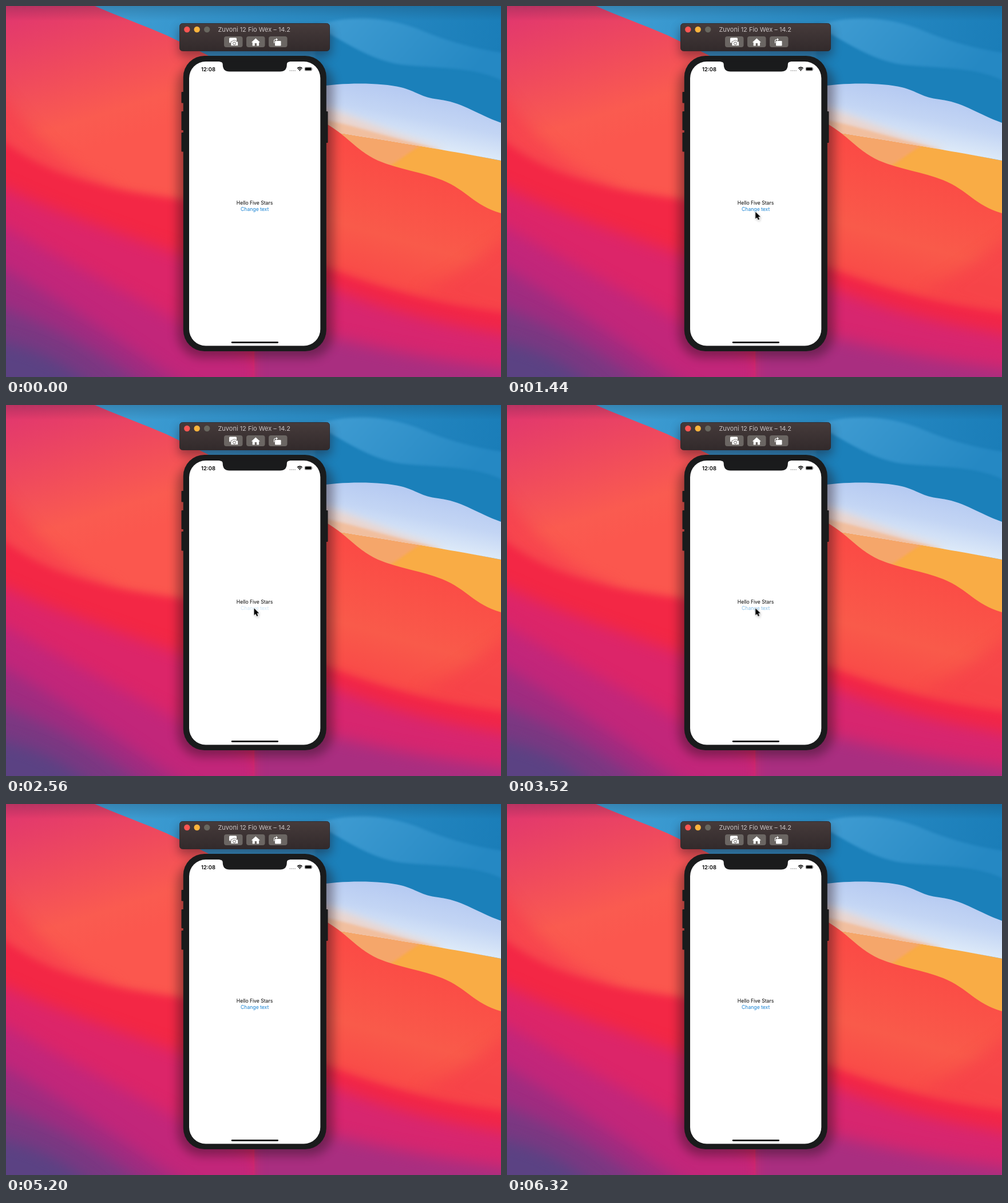
Recreate the animation shown at these times as an HTML page. Size 865 by 648 pixels, loop 6.4 s.

```html
<!DOCTYPE html>
<html lang="en">
<head>
<meta charset="utf-8">
<title>Simulator</title>
<style>
  html, body { margin: 0; width: 100%; height: 100%; overflow: hidden; background: #1b80bb; }
  svg { display: block; width: 865px; height: 648px; }
  text { font-family: Inter, sans-serif; }
  .soft { filter: blur(13px); }
  .mid { filter: blur(7px); }
  .fine { filter: blur(2px); }
  .shadow { filter: blur(9px); }
  #link { animation: press 6400ms linear infinite; }
  #cursor { animation: move 6400ms linear infinite; }

  @keyframes press {
    0%, 37.4% { opacity: 1; }
    37.5%, 41.25% { opacity: .2; }
    46.25%, 49.9% { opacity: 1; }
    50%, 53.125% { opacity: .2; }
    58.125%, 100% { opacity: 1; }
  }
  @keyframes move {
    0%, 8.75% { transform: translate(434px, 670px); animation-timing-function: ease-out; }
    22.5% { transform: translate(433.6px, 359px); }
    35%, 41.25% { transform: translate(433px, 354.5px); }
    50%, 57.5% { transform: translate(433.6px, 354.5px); animation-timing-function: ease-in; }
    66.25% { transform: translate(433px, 398px); animation-timing-function: ease-in; }
    76.25%, 100% { transform: translate(433px, 670px); }
  }
</style>
</head>
<body>
<svg viewBox="0 0 865 648">
  <defs>
    <linearGradient id="sky" x1="0" y1="0" x2="1" y2=".15">
      <stop offset="0" stop-color="#4aa6da"/>
      <stop offset=".55" stop-color="#2d8fc8"/>
      <stop offset="1" stop-color="#1a7db8"/>
    </linearGradient>
    <linearGradient id="lobe" x1="0" y1="0" x2="1" y2=".3">
      <stop offset="0" stop-color="#419dd3"/>
      <stop offset="1" stop-color="#2588c3"/>
    </linearGradient>
    <linearGradient id="mist" gradientUnits="userSpaceOnUse" x1="700" y1="150" x2="680" y2="250">
      <stop offset="0" stop-color="#b7cbf2"/>
      <stop offset=".4" stop-color="#c3d5f4"/>
      <stop offset="1" stop-color="#e6f1fa"/>
    </linearGradient>
    <linearGradient id="warm" gradientUnits="userSpaceOnUse" x1="70" y1="0" x2="150" y2="250">
      <stop offset="0" stop-color="#e2386d"/>
      <stop offset=".45" stop-color="#f04b5c"/>
      <stop offset=".8" stop-color="#fa5b50"/>
      <stop offset="1" stop-color="#fb574e"/>
    </linearGradient>
    <linearGradient id="coral" gradientUnits="userSpaceOnUse" x1="720" y1="270" x2="660" y2="480">
      <stop offset="0" stop-color="#fb4a45"/>
      <stop offset=".65" stop-color="#f95a4a"/>
      <stop offset="1" stop-color="#f94b48"/>
    </linearGradient>
    <linearGradient id="bar" x1="0" y1="0" x2="0" y2="1">
      <stop offset="0" stop-color="#463b3b"/>
      <stop offset="1" stop-color="#322a2b"/>
    </linearGradient>
    <linearGradient id="dim" x1="0" y1="0" x2="0" y2="1">
      <stop offset="0" stop-color="#123" stop-opacity=".2"/>
      <stop offset="1" stop-color="#123" stop-opacity="0"/>
    </linearGradient>
    <clipPath id="left"><path d="M0 0H155C210 24 265 42 305 63C350 84 400 110 434 130V648H0Z"/></clipPath>
    <clipPath id="right"><path d="M434 110C500 160 535 187 562 207C600 230 612 252 650 270C688 286 727 290 762 304C806 322 817 348 865 362V648H434Z"/></clipPath>
    <clipPath id="pale"><path id="paleEdge" d="M540 142C590 133 655 134 690 142C717 149 727 160 755 163C800 169 820 188 865 204V270C770 252 700 240 540 215Z"/></clipPath>
  </defs>

  <!-- sky -->
  <rect width="865" height="648" fill="url(#sky)"/>
  <path class="fine" d="M540 30C590 60 640 98 700 103C760 107 820 106 870 130V215H540Z" fill="#1b80ba"/>
  <path class="fine" d="M540 35C600 15 660 18 720 40C770 62 820 75 870 82V132C820 106 760 109 700 103C640 98 590 60 540 35Z" fill="url(#lobe)"/>

  <!-- mist and sunlight -->
  <path d="M540 195C620 218 735 245 865 270V370H540Z" fill="#f9ac45"/>
  <path class="fine" d="M540 190C620 212 690 236 727 243C708 252 690 268 670 280L540 260Z" fill="#f5a66a"/>
  <use href="#paleEdge" fill="url(#mist)"/>
  <g clip-path="url(#pale)">
    <path class="mid" d="M540 175C600 185 650 218 770 250L540 240Z" fill="#ead4cd"/>
    <path class="fine" d="M540 195C610 208 680 234 760 250L540 240Z" fill="#f1bf9f"/>
  </g>

  <!-- left waves -->
  <g clip-path="url(#left)">
    <rect width="440" height="648" fill="url(#warm)"/>
    <path class="soft" d="M-60 90C30 190 60 270 200 320L-60 400Z" fill="#f63d4d" opacity=".7"/>
    <path class="mid" d="M-40 205C60 300 160 325 440 352V690H-60Z" fill="#f32745"/>
    <path class="soft" d="M-40 300C60 350 160 385 440 480V690H-60Z" fill="#dc2569"/>
    <path class="soft" d="M-40 365C60 420 200 500 440 620V690H-60Z" fill="#c2267a"/>
    <path class="soft" d="M-40 440C60 490 180 570 350 690H-60Z" fill="#9f2c80"/>
    <path class="soft" d="M-40 515C50 545 170 600 275 690H-60Z" fill="#7a3882"/>
    <path class="soft" d="M-40 580C30 590 110 615 175 690H-60Z" fill="#5b4283"/>
  </g>

  <!-- right waves -->
  <g clip-path="url(#right)">
    <rect x="434" width="431" height="648" fill="url(#coral)"/>
    <path class="soft" d="M900 390C840 420 800 470 720 500L900 560Z" fill="#f63f49" opacity=".7"/>
    <path class="mid" d="M430 400C600 482 740 520 910 540V690H430Z" fill="#f22647"/>
    <path class="soft" d="M430 420C580 518 740 552 910 580V690H430Z" fill="#d7266f"/>
    <path class="soft" d="M430 540C580 586 720 615 910 640V690H430Z" fill="#a92e80"/>
  </g>
  <rect width="865" height="26" fill="url(#dim)"/>

  <!-- shadows -->
  <rect class="shadow" x="300" y="98" width="272" height="516" rx="42" fill="#201018" opacity=".42"/>
  <rect class="shadow" x="302" y="38" width="266" height="50" rx="6" fill="#201018" opacity=".42"/>

  <!-- title bar -->
  <rect x="303.5" y="30.5" width="262" height="48" rx="5" fill="url(#bar)" stroke="#2c2425" stroke-width=".8"/>
  <circle cx="316.3" cy="41" r="5.2" fill="#fc5552"/>
  <circle cx="333.7" cy="41" r="5.2" fill="#fcb33d"/>
  <circle cx="351.2" cy="41" r="5.2" fill="#68675f"/>
  <text x="433.7" y="45" font-size="11" text-anchor="middle" fill="#c9c3c3">Zuvoni 12 Fio Wex – 14.2</text>
  <g fill="#6b6663">
    <rect x="381" y="53" width="32.500" height="19" rx="4"/>
    <rect x="420" y="53" width="32.500" height="19" rx="4"/>
    <rect x="459" y="53" width="32.500" height="19" rx="4"/>
  </g>
  <g fill="#fff">
    <rect x="390" y="55.500" width="13" height="9" rx="1.500"/>
    <path d="M393 62H395.500L397 60H401L402.500 62H405.500V69.500H393Z" stroke="#6b6663" stroke-width=".8"/>
    <circle cx="399" cy="65.500" r="2.500" stroke="#6b6663" fill="#fff"/>
    <path d="M436.300 56.500L444 63.500H442V69.500H438V65H434.700V69.500H430.700V63.500H428.700Z"/>
    <rect x="470" y="61" width="10.500" height="8.500" rx="1.200"/>
    <path d="M468.500 65V60.500Q468.500 58.500 471 58.500H472.500" fill="none" stroke="#fff" stroke-width="1.100"/>
    <path d="M472 56L475 58.500L472 61Z"/>
  </g>

  <!-- phone -->
  <g fill="#1a1b1c">
    <rect x="306.500" y="150" width="6" height="19.500" rx="1"/>
    <rect x="306.500" y="184" width="6" height="33" rx="1"/>
    <rect x="306.500" y="221" width="6" height="33.500" rx="1"/>
    <rect x="557" y="184" width="5.500" height="55" rx="1"/>
    <rect x="309.800" y="87" width="250" height="516" rx="37"/>
  </g>
  <rect x="320" y="97" width="229.300" height="496.500" rx="29" fill="#fff"/>
  <path d="M373 96.500H496V97.200Q490.800 97.500 490.800 102Q490.800 114.500 479 114.500H390.500Q378.700 114.500 378.700 102Q378.700 97.500 373 97.200Z" fill="#1a1b1c"/>
  <rect x="393.700" y="586.200" width="82.300" height="2.800" rx="1.400" fill="#000"/>

  <!-- status bar -->
  <text x="353.500" y="113.500" font-size="9.300" font-weight="600" text-anchor="middle">12:08</text>
  <path d="M495.500 112.800H506" stroke="#b5b5b5" stroke-width="1.700" stroke-dasharray="1.700 1.200"/>
  <g fill="none" stroke="#000" stroke-width="1.500">
    <path d="M509 109Q513.300 105.200 517.600 109"/>
    <path d="M510.600 111Q513.300 108.600 516 111"/>
  </g>
  <path d="M511.800 112.200Q513.300 111 514.800 112.200L513.300 113.800Z"/>
  <rect x="521.700" y="106.700" width="13" height="6.800" rx="2" fill="#fff" stroke="#aaa" stroke-width=".6"/>
  <rect x="522.600" y="107.600" width="11.200" height="5" rx="1.200"/>
  <path d="M535.600 109V111.200" stroke="#999" stroke-width=".8"/>

  <!-- app -->
  <g font-size="8.600" text-anchor="middle">
    <text x="434.500" y="346.700">Hello Five Stars</text>
    <text id="link" x="434.700" y="357.700" fill="#1480d2">Change text</text>
  </g>

  <g id="cursor">
    <path class="fine" d="M1 2V15L4 12L6 17L9 16L7 11H11Z" opacity=".3"/>
    <path d="M.5 .5V12.800L3.300 10.200L5.200 14.600L7.400 13.700L5.500 9.300H9.300Z" stroke="#fff" stroke-width="1.600" paint-order="stroke"/>
  </g>
</svg>
</body>
</html>
```
